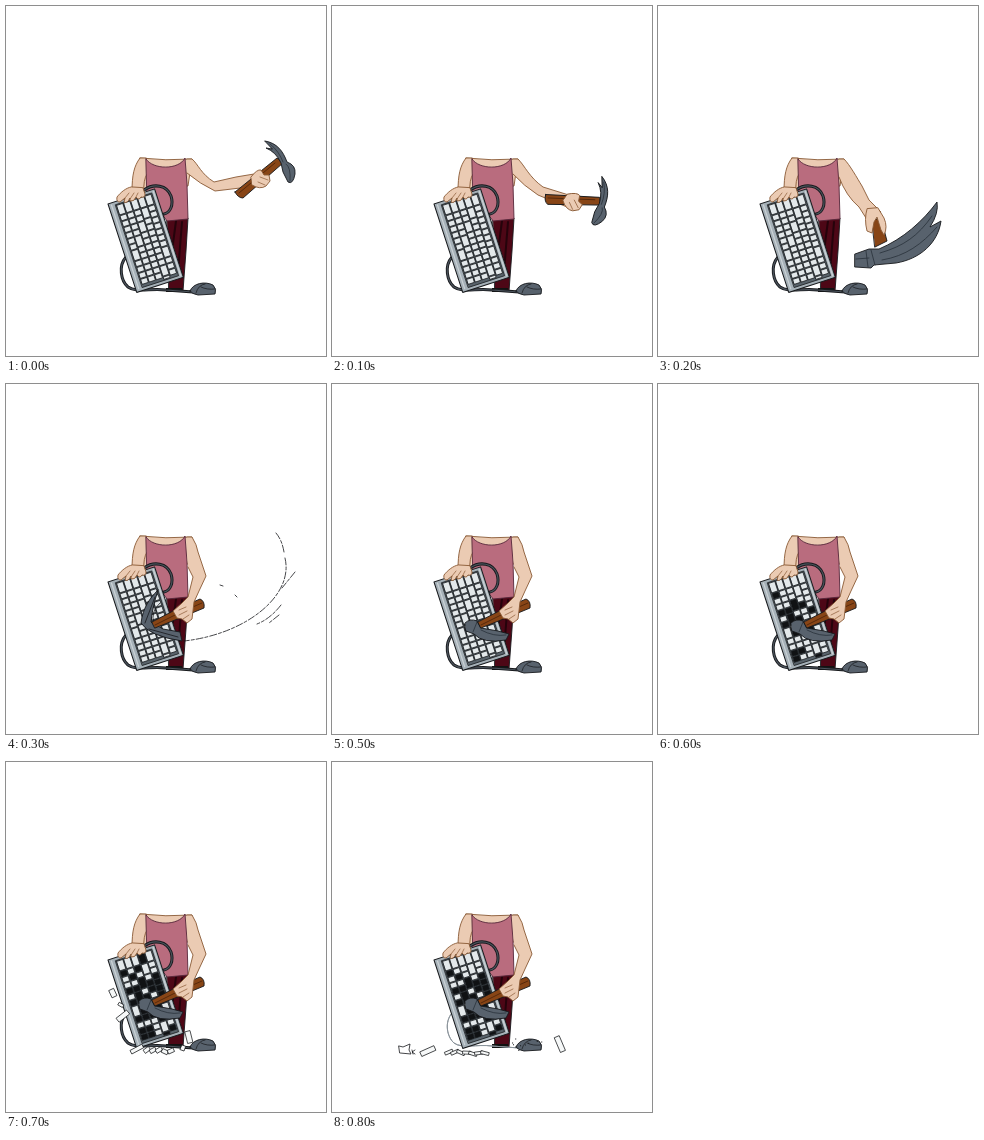
An HTML page with a canvas for the animation above (0.9 s loop, 320 by 350 pixels).

```html
<!DOCTYPE html>
<html lang="en">
<head>
<meta charset="utf-8">
<title>Keyboard and hammer</title>
<style>
html, body { margin: 0; width: 100%; height: 100%; overflow: hidden; background: #fff; }
canvas { display: block; }
</style>
</head>
<body>
<canvas id="stage" width="320" height="350"></canvas>
<script>
const ctx = document.getElementById('stage').getContext('2d');
const INK = '#17191c', SKIN = '#ebcbb3', SKIN_LINE = '#8a5a35', STEEL = '#58626d', WOOD = '#884516';
const STEP_MS = 100, STEPS = 9;

function shape(d, fill, line = INK, width = 0.9) {
  const path = new Path2D(d);
  if (fill) { ctx.fillStyle = fill; ctx.fill(path); }
  if (line) { ctx.strokeStyle = line; ctx.lineWidth = width; ctx.stroke(path); }
}

function local(x, y, degrees, draw) {
  ctx.save();
  ctx.translate(x, y);
  ctx.rotate(degrees * Math.PI / 180);
  draw();
  ctx.restore();
}

function box(x, y, w, h, fill, line = INK, width = 0.8) {
  shape(`M${x} ${y}h${w}v${h}h${-w}Z`, fill, line, width);
}

function noise(a, b) {
  const n = Math.sin(a * 12.9898 + b * 78.233) * 43758.5453;
  return n - Math.floor(n);
}

function body() {
  shape('M161 212L182 212L180 245L177 285L163 284Z', '#4d0716');
  shape('M170 215L166 245M176 216L172 266', null, '#25030b', 2);
  shape('M160 282L176 282L176 286L160 286Z', '#111', null);
  shape('M134 152Q160 155 186 153L182 180L138 184Z', SKIN, SKIN_LINE);
  shape('M140 152L134 152C128 160 126 169 126 186L138 187Q137 174 141 168Z', SKIN, SKIN_LINE);
  shape('M140 153C147 164 173 164 179 152L181 178L182 213L161 215L141 187Z', '#b96c7e', '#56283a');
}

function cables(faint) {
  for (const [color, width] of [[INK, 3], ['#4b535c', 1.2]]) {
    shape('M138 184C148 177 161 179 165 190C168 199 164 207 158 208', null, color, width);
    shape('M120 251C112 260 115 275 122 281C130 287 145 282 160 284L187 286', null,
      faint ? '#8b949b' : color, faint ? 1 : width);
  }
}

function mouse() {
  shape('M184 285C187 277 199 275 207 279Q211 283 209 288L192 289Q186 288 184 285Z', STEEL);
  shape('M190 287Q192 279 199 278M195 281Q201 284 209 283', null, INK, 0.7);
}

function keyboard(broken) {
  local(102, 198, -18, () => {
    box(0, 0, 49, 93, '#a5b0b7', INK, 1);
    shape('M3 2V90M47 2V91', null, '#cbd2d6', 1.2);
    box(7, 3, 38, 87, '#59636b', INK, 0.7);
    for (let col = 0; col < 5; col++) {
      let y = 4;
      for (let row = 0; y < 88; row++) {
        const tall = row === 0 || (row + col * 2) % 9 === 7;
        const h = Math.min(tall ? 10 : 5.2, 89 - y);
        const gone = noise(col + 1, row + 1) < broken * (0.5 + y / 88);
        box(8 + col * 7.4, y, 6.2, h, gone ? '#101214' : '#e3e8ea', INK, 0.7);
        y += h + 1;
      }
    }
  });
}

function restingHand(shift) {
  ctx.save();
  ctx.translate(shift, 0);
  shape('M126 181C121 182 116 186 112 191Q111 196 115 196L120 192L119 196Q122 198 125 192L125 195Q129 196 131 191Q134 195 136 191Q140 192 140 188L138 182Z', SKIN, SKIN_LINE);
  shape('M120 192L124 187M125 193L129 187M131 191L133 187', null, SKIN_LINE, 0.7);
  ctx.restore();
}

// Origin sits in the grip; the head points up and to the right.
function smallHammer(x, y, degrees) {
  local(x, y, degrees, () => {
    shape('M-26 12L16 -22L22 -17L-18 18Q-23 18 -26 12Z', WOOD);
    shape('M-22 13L14 -17', null, '#4b230a', 0.8);
    shape('M4 -39C16 -37 22 -29 26 -18Q35 -15 34 -6Q32 5 27 2L22 -8L20 -17Q15 -28 5 -32L11 -31Z', STEEL);
    shape('M25 -16Q30 -13 29 1M9 -36Q18 -29 22 -18', null, '#2c343c', 0.8);
    shape('M-10 -3Q-4 -11 0 -10L3 -5L8 -5L9 1L5 6Q-1 10 -9 5Z', SKIN, SKIN_LINE);
    shape('M-1 -3L7 0M-3 2L4 5', null, SKIN_LINE, 0.7);
  });
}

function raisedArm() {
  shape('M181 153L186 153C192 158 195 168 208 176L230 171L248 168L251 180L209 185Q194 178 181 167', SKIN, SKIN_LINE);
  smallHammer(255, 174, 0);
}

function loweringArm() {
  shape('M181 153L186 153C193 160 197 171 211 181L240 190L235 201L206 189Q192 180 181 168', SKIN, SKIN_LINE);
  smallHammer(241, 197, 42);
}

function swingingArm() {
  shape('M181 153L186 153C192 159 199 172 204 180L211 194L223 206L208 212L201 201Q188 190 181 171', SKIN, SKIN_LINE);
  shape('M214 214L223 212L229 235L217 241Z', WOOD);
  shape('M197 248L211 243L221 243C245 233 265 215 279 196Q281 207 272 221L283 215C280 237 262 253 238 257L216 259L213 262L197 261Z', STEEL);
  shape('M213 244L217 259M208 245L210 261M222 247C246 240 260 230 274 210M224 254C248 250 264 238 279 221M198 253L211 252', null, '#29323a', 0.8);
  shape('M209 203Q206 213 209 225L214 227L216 216L219 211L223 224L226 229Q230 221 226 212L220 202Z', SKIN, SKIN_LINE);
}

function strikingArm(smeared) {
  if (smeared) {
    shape('M152 206C143 215 137 224 135 239Q143 252 176 257L174 248L157 245L145 238Q146 225 152 206Z', STEEL);
    shape('M149 213L139 239M154 219Q144 228 148 239M143 245L172 253', null, INK, 0.8);
  } else {
    shape('M133 239Q138 234 145 237L149 244L166 247L177 250L174 256Q151 260 142 250L134 247Z', STEEL);
    shape('M145 238L141 248M149 246Q162 253 174 251', null, '#29323a', 0.8);
  }
  shape('M146 238L169 226L194 215Q199 217 198 224L174 234L149 244Z', WOOD);
  shape('M149 241L173 229L196 219', null, '#4b230a', 0.8);
  shape('M181 153L186 153Q191 161 192 168L200 192L193 207L188 218L186 235L181 239L176 235L171 234L167 227L176 219L182 213L187 193L182 183', SKIN, SKIN_LINE);
  shape('M173 226L180 223M173 231L181 227M177 235L183 231', null, SKIN_LINE, 0.7);
}

function swoosh() {
  ctx.setLineDash([7, 2, 3, 2]);
  shape('M270 149Q276 156 278 168M279 174C288 211 241 250 178 257M289 188L276 204M275 221Q264 235 251 240M273 231L263 239M214 201L217 202M229 211L231 213', null, INK, 0.8);
  ctx.setLineDash([]);
}

function chip(x, y, w, h, degrees) {
  local(x, y, degrees, () => box(-w / 2, -h / 2, w, h, '#f6f8f8', INK, 0.7));
}

function flyingChips() {
  chip(107, 231, 5, 8, -25);
  chip(117, 254, 13, 5, -38);
  chip(131, 287, 13, 4, -28);
  chip(115, 243, 5, 3, 30);
  chip(183, 275, 5, 12, -14);
  chip(177, 286, 4, 5, 20);
  for (let i = 0; i < 5; i++) chip(141 + i * 6, 287 + noise(i, 3) * 3, 6, 4, noise(i, 5) * 80 - 40);
}

function fallenChips() {
  shape('M67 284L71 285L78 282L77 288L79 292L68 291Z', '#fff', INK, 0.8);
  shape('M80 288L81 292M83 288L80 290L83 292', null, INK, 0.8);
  chip(96, 289, 15, 5, -24);
  chip(228, 282, 5, 16, -23);
  for (let i = 0; i < 7; i++) chip(117 + i * 6, 290 + noise(i, 2) * 2, 8, 3, noise(i, 7) * 60 - 30);
  for (let i = 0; i < 9; i++) box(180 + noise(i, 4) * 30, 275 + noise(i, 9) * 14, 1, 1, INK, null);
}

function draw(step) {
  ctx.fillStyle = '#fff';
  ctx.fillRect(0, 0, 320, 350);
  ctx.lineJoin = ctx.lineCap = 'round';
  body();
  cables(step === 8);
  keyboard([0, 0, 0, 0, 0, 0, 0.18, 0.5, 0.45][step]);
  restingHand(step === 0 || step === 8 ? -1 : 0);
  mouse();
  if (step === 0) raisedArm();
  else if (step === 1) loweringArm();
  else if (step === 2) swingingArm();
  else strikingArm(step === 3);
  if (step === 3) swoosh();
  if (step === 7) flyingChips();
  if (step === 8) fallenChips();
}

function frame() {
  draw(Math.floor(performance.now() / STEP_MS) % STEPS);
  requestAnimationFrame(frame);
}
frame();
</script>
</body>
</html>
```
